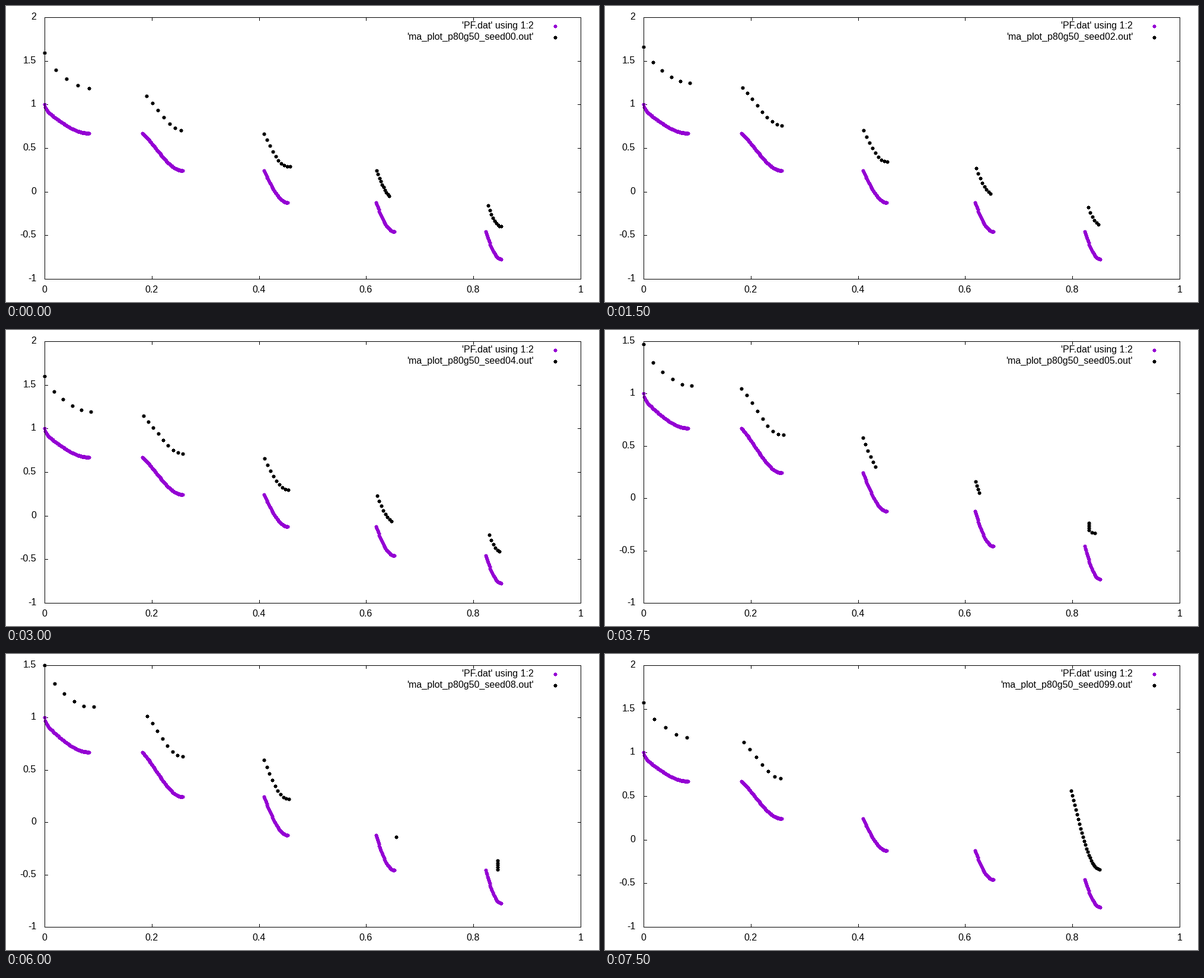
A matplotlib script for the animation above (8250 ms loop, 1000 px wide and 500 px high).

```python
import numpy as np
import matplotlib.pyplot as plt
from matplotlib.animation import FuncAnimation
from matplotlib.collections import PolyCollection

W, H, DPI = 1000, 500, 100
LEFT, RIGHT, TOP, BOTTOM = 65, 969, 19, 461
FONT = dict(family="Liberation Sans", size=16 * 72 / DPI, color="black",
            va="baseline")

# A small filled dot, 7 pixels across: one quarter turned four times
QUARTER = np.array([(3.5, .5), (2.5, .5), (2.5, 2.5), (.5, 2.5), (.5, 3.5)])
TURN = np.array([(0, 1), (-1, 0)])
DOT = .5 + np.concatenate([QUARTER @ np.linalg.matrix_power(TURN, k)
                           for k in range(4)])


def to_px(x):
    return LEFT + x * (RIGHT - LEFT)


def to_x(px):
    return (px - LEFT) / (RIGHT - LEFT)


def to_py(y, top):
    return BOTTOM - (y + 1) * (BOTTOM - TOP) / (top + 1)


def zdt3(x, g=1.0):
    """Second objective of ZDT3; g = 1 is the optimal front."""
    return g - np.sqrt(g * x) - x * np.sin(10 * np.pi * x)


def dots(px, py):
    return [DOT + spot for spot in np.rint(np.column_stack([px, py]))]


def bar(x, y, w, h):
    return np.array([(x, y), (x + w, y), (x + w, y + h), (x, y + h)])


def arc(top, g, first, last, n, *own_g):
    """n dots between two columns; own_g gives another g, or its two ends."""
    px = np.linspace(first, last, n)
    ends = own_g or (g,)
    y = zdt3(to_x(px), np.linspace(ends[0], ends[-1], n))
    return dots(px, to_py(y, top))


runs = []


def run(top, g, *arcs):
    runs.append((top, sum((arc(top, g, *a) for a in arcs), [])))


USUAL = ((65, 143, 6), (232, 298, 9), (436, 476, 9), (626, 650, 8),
         (815, 832, 6))

run(2, 1.59, (65, 140, 5), (237, 295, 7), (435, 479, 10), (625, 646, 10),
    (813, 835, 9, 1.63))
run(2.5, 2.19, (65, 144, 5), (231, 295, 8), (438, 476, 10), (627, 657, 13),
    (826, 826, 2, 2.25, 2.23))
run(2, 1.66, *USUAL)
run(1.5, 1.31, (65, 137, 6, 1.34), (236, 299, 10), (459, 471, 6, 1.38, 1.31),
    (653, 655, 3, 1.39, 1.45))
run(2, 1.6, *USUAL)
run(1.5, 1.47, (65, 146, 6), (230, 301, 9), (435, 456, 6), (625, 631, 4),
    (816, 816, 5, 1.6, 1.49), (821, 826, 2, 1.58, 1.67))
run(2, 1.655, (65, 148, 8, 1.72, 1.65), (229, 306, 11),
    (439, 461, 8, 1.67, 1.7), (630, 635, 4, 1.73, 1.8))
run(2, 1.837, (65, 146, 6), (231, 301, 10), (436, 470, 9), (627, 640.6, 5))
run(1.5, 1.498, (65, 148, 6), (238, 298, 8), (435, 477, 10), (658, 658, 1),
    (829, 829, 5, 1.65, 1.52))
run(2.5, 2.12, *USUAL)
run(2, 1.575, (65, 138, 5), (234, 296, 7, 1.59), (786, 834, 25, 1.65, 1.72))

SEEDS = [f"{i:02d}" for i in range(10)] + ["099"]
FRONT = np.concatenate([np.arange(a, b, .001) for a, b in (
    (0, .0835), (.1823, .258), (.4093, .454), (.6184, .653), (.8233, .852))])

BORDER = [bar(x, y, w, h) for x, y, w, h in (
    (LEFT, TOP, RIGHT - LEFT + 1, 1), (LEFT, BOTTOM, RIGHT - LEFT + 1, 1),
    (LEFT, TOP, 1, BOTTOM - TOP + 1), (RIGHT, TOP, 1, BOTTOM - TOP + 1))]

fig = plt.figure(figsize=(W / DPI, H / DPI), dpi=DPI, facecolor="white")
ax = fig.add_axes([0, 0, 1, 1])
ax.set_xlim(0, W)
ax.set_ylim(H, 0)
ax.axis("off")


def layer(color, zorder):
    polys = PolyCollection([], facecolors=color, edgecolors="none",
                           linewidths=0, antialiased=False, zorder=zorder)
    return ax.add_collection(polys, autolim=False)


ticks = layer("black", 1)
front = layer("#9400d3", 2)
ink = layer("black", 3)

x_ticks = []
for x in np.arange(6) / 5:
    col = round(to_px(x))
    x_ticks += [bar(col, TOP, 1, 6), bar(col, BOTTOM - 5, 1, 6)]
    ax.text(col - .3, 484, f"{x:g}", ha="center", **FONT)

ax.text(890, 38, "'PF.dat' using 1:2", ha="right", **FONT)
title = ax.text(890, 57, "", ha="right", **FONT)
labels = [ax.text(51, 0, "", ha="right", **FONT) for _ in range(8)]


def draw(i):
    top, shapes = runs[i]
    y_ticks = []
    for k, label in enumerate(labels):
        v = -1 + k / 2
        label.set_visible(v <= top)
        if v <= top:
            row = round(to_py(v, top))
            y_ticks += [bar(LEFT, row, 6, 1), bar(RIGHT - 5, row, 6, 1)]
            label.set_text(f"{v:g}".replace("\u2212", "-"))
            label.set_y(row + 4)
    title.set_text(f"'ma_plot_p80g50_seed{SEEDS[i]}.out'")
    ticks.set_verts(x_ticks + y_ticks)
    front.set_verts(dots(to_px(FRONT), to_py(zdt3(FRONT), top))
                    + dots([926], [34]))
    ink.set_verts(BORDER + shapes + dots([926], [53]))
    return [ticks, front, ink, title, *labels]


anim = FuncAnimation(fig, draw, frames=len(runs), interval=750,
                     init_func=lambda: draw(0), repeat=True, repeat_delay=0)
plt.show()
```
